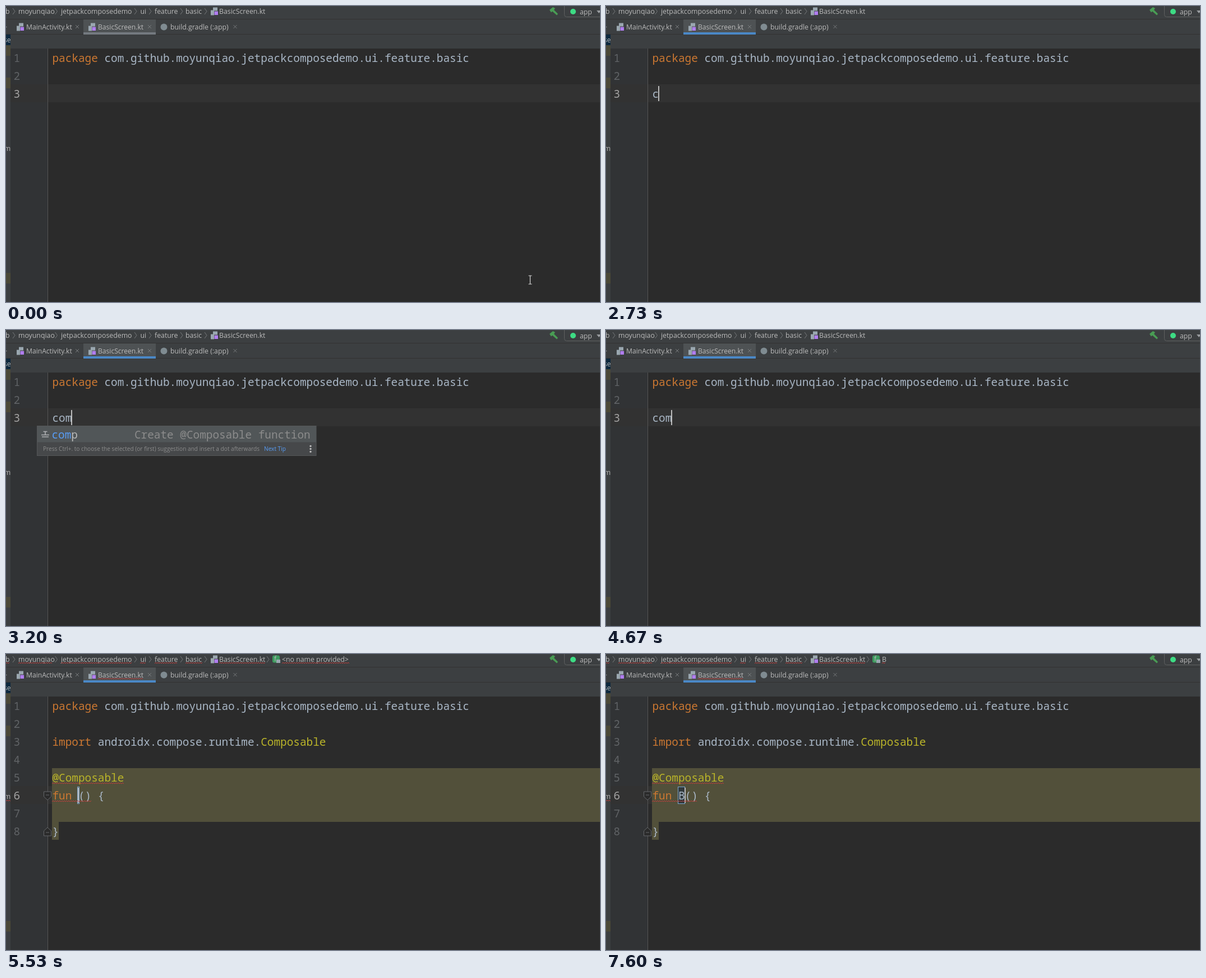
An HTML page that plays this animation: 1059 by 529 pixels, repeating every 8000 ms.

```html
<!DOCTYPE html>
<html lang="en">
<head>
<meta charset="utf-8">
<title>Editor live template</title>
<style>
  html, body { margin: 0; width: 100%; height: 100%; overflow: hidden; background: #2b2b2b; }
  svg { display: block; width: 1059px; height: 529px; }
  text { white-space: pre; }
  .code { font: 19.36px "Noto Sans Mono", "DejaVu Sans Mono", monospace; fill: #a9b7c6; }
  .ui { font: 12.1px "Open Sans", "Noto Sans", sans-serif; fill: #bbbbbb; }
  .crumb { font-size: 12.3px; }
  .tip { font-size: 10.15px; fill: #8c8c8c; }
  .kw { fill: #cc7832; }
  .ann { fill: #bbb529; }
  .num { fill: #606366; }
  .now { fill: #a4a3a3; }
  .item { fill: #bbbbbb; }
  .bold { font-weight: 600; }
  .hit { fill: #589df6; }
  .hint { fill: #8c8c8c; }
  .line { fill: none; stroke: #777a7c; }
  .wave { fill: none; stroke: #bc3f3c; stroke-width: 1; }
</style>
</head>
<body>
<svg id="stage" viewBox="0 0 1059 529"></svg>
<script>
const LOOP = 8000, COL = 11.616, LEFT = 82.5, ROW = 32;
const FOLDER = 'moyunqiao';
const stage = document.getElementById('stage');

const rect = (x, y, w, h, fill, more = '') =>
  `<rect x="${x}" y="${y}" width="${w}" height="${h}" fill="${fill}" ${more}/>`;
const text = (x, y, s, cls) => `<text x="${x}" y="${y}" class="${cls}">${s}</text>`;
const span = (cls, s) => `<tspan class="${cls}">${s}</tspan>`;
const path = (d, cls = 'line', more = '') => `<path d="${d}" class="${cls}" ${more}/>`;
const rowTop = n => 76 + ROW * (n - 1);
const baseline = n => rowTop(n) + 24;
const code = (n, s) => text(LEFT, baseline(n), s, 'code');
const number = (n, cls = '') => text(13.5, baseline(n), n, 'code num ' + cls);

// Content shown only inside the given [from, to) spans
const during = (spans, content) => `<g data-t="${spans}">${content}</g>`;

const wave = (x, end, y) => {
  let d = `M${x} ${y + 1}`;
  for (let i = 1; x + i * 2 <= end; i++) d += `L${x + i * 2} ${y + (i % 2 ? -1 : 1)}`;
  return path(d, 'wave');
};
const chevron = x => path(`M${x - 2} 4l4 5.5l-4 5.5`);
const cross = x => path(`M${x - 3} 34l6 6m0 -6l-6 6`);
const caret = (col, n = 3) => rect(Math.floor(82 + COL * col), rowTop(n) + 3, 2, 27, '#bbbbbb');
const caretRow = n =>
  rect(8, rowTop(n), 66, ROW, '#323232') + rect(75, rowTop(n), 984, ROW, '#323232');

const fileIcon = (x, y) =>
  `<path d="M${x + 4} ${y}h8v6h-6v8h-6v-9h4z" fill="#9aa7b0"/>` +
  rect(x + 6.5, y + 7, 6.5, 6.5, '#b07df0');

function frameBars() {
  const crumbs = [[-1, 'b'], [22, FOLDER], [98, 'jetpackcomposedemo'], [239.5, 'ui'],
    [265, 'feature'], [320, 'basic'], [380, 'BasicScreen.kt']];
  return rect(0, 0, 1059, 76, '#3c3f41') +
    rect(0, 23, 1059, 1, '#323232') +
    rect(138, 24, 129, 26, '#4e5254') +
    rect(0, 50, 1059, 1, '#323232') +
    crumbs.map(([x, s]) => text(x, 14, s, 'ui crumb')).join('') +
    [14, 89.5, 231, 257, 313, 356].map(chevron).join('') +
    fileIcon(365, 2.5) +
    fileIcon(19, 30.5) + text(36, 42, 'MainActivity.kt', 'ui') + cross(127) +
    fileIcon(147, 30.5) + text(164, 42, 'BasicScreen.kt', 'ui') + cross(256) +
    '<circle cx="281.5" cy="37.5" r="6" fill="#7f8b91"/>' +
    text(293, 42, 'build.gradle (:app)', 'ui crumb') + cross(408.5) +
    during('0 1530', rect(138, 47, 129, 4, '#747a80')) +
    during('1530 8000', rect(138, 47, 129, 4, '#4a88c7')) +
    '<path d="M969 7l6 -5l4 2l-2 3l7 7l-2 2.5l-8 -7l-2 2z" fill="#499c54"/>' +
    rect(995.5, -6, 90, 25.5, 'none', 'rx="4" stroke="#5e6060"') +
    '<circle cx="1011" cy="10" r="5" fill="#3ddc84"/>' +
    text(1023, 14.5, 'app', 'ui crumb') +
    '<path d="M1053 8h8l-4 5z" fill="#9a9da0"/>';
}

function sidePane() {
  return rect(0, 76, 8, 453, '#3c3f41') +
    rect(0, 37, 1.5, 1, '#9a9da0') +
    rect(0, 51, 8, 19, '#0d293e') + text(-4, 65, 'se', 'ui') +
    [70, 128, 477].map(y => rect(0, y, 8, 19, '#4b4938')).join('') +
    text(-3, 259, 'm', 'ui') +
    rect(8, 76, 66, 453, '#313335');
}

const tipLine = y =>
  text(66, y, 'Press Ctrl+. to choose the selected (or first) suggestion and insert a dot afterwards', 'ui tip') +
  text(460, y, 'Next Tip', 'ui tip hit') +
  [-8.5, -3.5, 1.5].map(d => `<circle cx="543" cy="${y + d}" r="1.7" fill="#bbbbbb"/>`).join('');

function popup(rows, typed) {
  const tipTop = 172 + 28 * rows.length;
  const items = rows.map((word, i) => {
    const y = 194 + 28 * i, template = word === 'comp';
    const label = span('hit', word.slice(0, typed)) + word.slice(typed);
    const extra = template
      ? path(`M66.5 ${y - 12.5}h7m-3.5 0v6m-7 0h14m-13 3.5h12`, 'line', 'style="stroke:#afb1b3;stroke-width:1.6"') +
        text(229, y, 'Create @Composable function', 'code hint')
      : '';
    return text(81.5, y, label, 'code item' + (template ? '' : ' bold')) + extra;
  });
  return rect(55.5, 171.5, 497.5, tipTop - 171.5 + 24.5, '#46484a', 'stroke="#555759"') +
    rect(56, 172, 497, 28.5, '#515658') + items.join('') + tipLine(tipTop + 16);
}

const fold = (y, dir) =>
  path(`M67.5 ${y - 7 * dir}h13v${9 * dir}l-6.5 ${6 * dir}l-6.5 ${-6 * dir}zM71 ${y - dir}h6`,
    'line', 'style="fill:#2b2b2b;stroke:#64676a"');

function typing() {
  return caretRow(3) + number(3, 'now') +
    during('2730 3000', code(3, 'c')) +
    during('3000 3200', code(3, 'co')) +
    during('3200 4870', code(3, 'com')) +
    during('1530 2530', caret(0)) +
    during('2730 3000', caret(1)) +
    during('3000 3200', caret(2)) +
    during('3200 4000,4530 4870', caret(3)) +
    during('2870 3000', popup(['class', 'comp', 'class BasicScreen', 'const val'], 1)) +
    during('3000 3200', popup(['comp', 'const val'], 2)) +
    during('3200 4670', popup(['comp'], 3));
}

function inserted() {
  const fn = name => code(6, span('kw', 'fun ') + name + '() {');
  const crumbEnds = [[0, 6], [22, 83], [98, 224], [239, 250], [265, 305], [320, 350], [380, 462]];
  const fnIcon = chevron(467) + rect(475, 2.5, 13, 13, '#3e9b5f', 'rx="3"') +
    text(478, 13, 'f', 'ui') + rect(482, 10, 7, 6, '#9aa7b0');
  return caretRow(6) +
    during('5130 8000', rect(82, rowTop(5), 977, 3 * ROW, '#52503a') + rect(82, rowTop(8), 12, ROW, '#52503a')) +
    [3, 4, 5, 7, 8].map(n => number(n)).join('') + number(6, 'now') +
    during('4870 5200', code(3, span('kw', 'import') + ' androidx.compose.runtime.Composable') +
      code(5, '@Composable')) +
    during('5200 8000', code(3, span('kw', 'import') + ' androidx.compose.runtime.' + span('ann', 'Composable')) +
      code(5, span('ann', '@Composable'))) +
    during('5130 7400', rect(127.5, 237.5, 3, 30, 'none', 'stroke="#7ba7cf"')) +
    during('7400 8000', rect(128.5, 237.5, 12, 30, '#323a3d', 'stroke="#7ba7cf"')) +
    during('4870 7400', fn('')) +
    during('7400 8000', fn('B')) +
    code(8, '}') +
    during('4870 6530,7000 7400', caret(4, 6)) +
    during('7400 8000', caret(5, 6)) +
    during('5130 8000', fold(253, 1) + fold(318, -1)) +
    during('5330 8000', wave(82, 210, 231)) +
    during('5330 7470', wave(82, 152, 263)) +
    during('7470 8000', wave(82, 163, 263)) +
    during('5400 8000', fnIcon) +
    during('5400 7600', text(492, 14, '&lt;no name provided&gt;', 'ui crumb')) +
    during('7600 8000', text(492, 14, 'B', 'ui crumb')) +
    during('5530 8000', crumbEnds.map(([a, b]) => wave(a, b, 16)).join('') +
      wave(164, 245, 44) + wave(0, 8, 262)) +
    during('5530 7600', wave(492, 613, 16)) +
    during('7600 8000', wave(492, 499, 16));
}

stage.innerHTML = rect(0, 0, 1059, 529, '#2b2b2b') + frameBars() + sidePane() +
  rect(74, 76, 1, 453, '#555555') +
  number(1) + number(2) +
  code(1, span('kw', 'package') + ` com.github.${FOLDER}.jetpackcomposedemo.ui.feature.basic`) +
  during('0 4870', typing()) +
  during('4870 8000', inserted()) +
  during('0 2730', '<path id="mouse" d="M-3 -7.5h2.5l.5 .5l.5 -.5h2.5M0 -7v14M-3 7.5h2.5l.5 -.5l.5 .5h2.5" fill="none" stroke="#d8d8d8" stroke-width="1.2"/>');

const timed = [...stage.querySelectorAll('[data-t]')].map(el => ({
  el, spans: el.dataset.t.split(',').map(s => s.split(' ').map(Number))
}));
const mouse = document.getElementById('mouse');

function draw() {
  const t = performance.now() % LOOP;
  for (const { el, spans } of timed)
    el.style.display = spans.some(([a, b]) => t >= a && t < b) ? '' : 'none';

  // The pointer is sampled 13 times on its way to the third line
  const step = t < 70 ? 0 : Math.min(13, Math.floor((t - 70) * 12 / 800) + 1);
  const p = step / 13, ease = p * p * (3 - 2 * p);
  mouse.setAttribute('transform', `translate(${934.5 - 788 * ease} ${489.5 - 326 * ease})`);
  requestAnimationFrame(draw);
}
draw();
</script>
</body>
</html>
```
